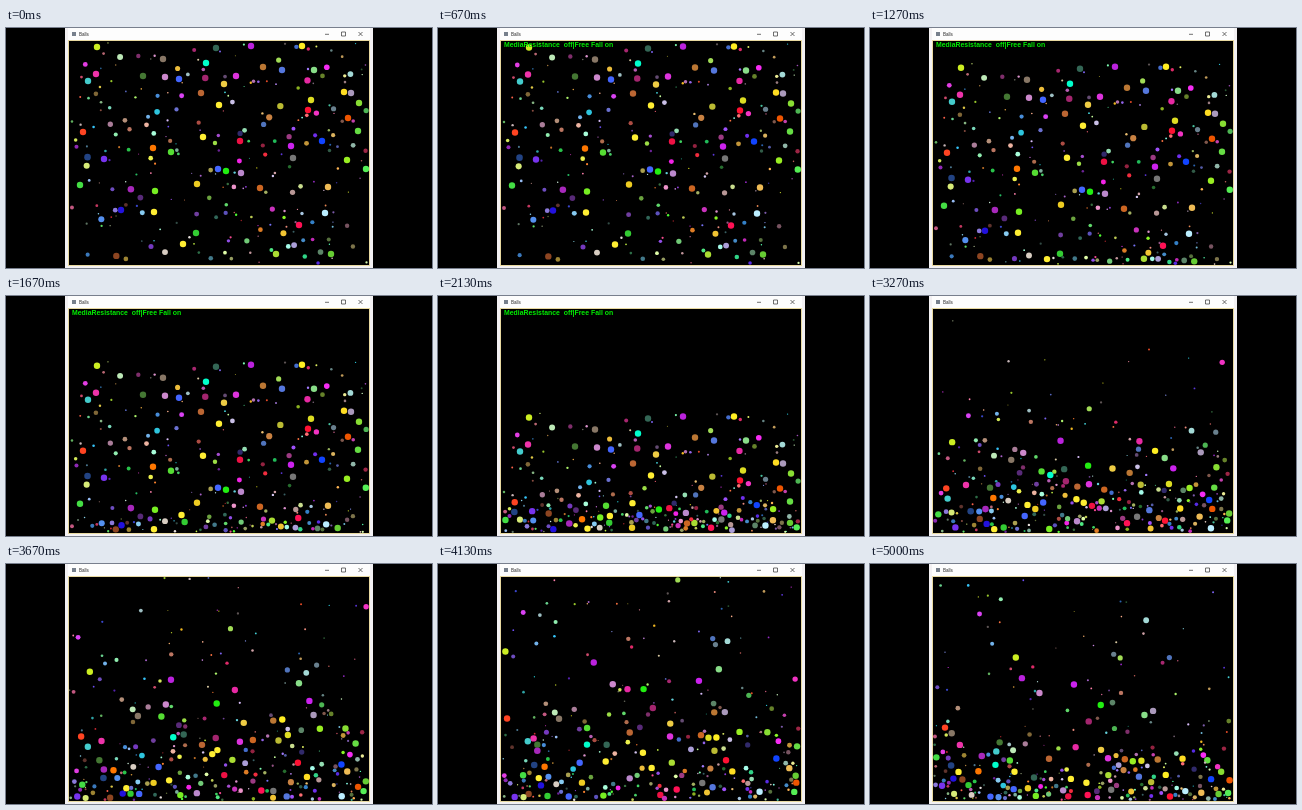
These frames come from a looping animation (426x240 px, 5.07 s). An HTML page with a canvas:

```html
<!DOCTYPE html>
<html lang="en">
<head>
<meta charset="utf-8">
<title>Balls</title>
<style>
  html, body { margin: 0; height: 100%; overflow: hidden; background: #000; }
  canvas { display: block; width: 100vw; height: 100vh; }
</style>
</head>
<body>
<canvas id="stage" width="426" height="240"></canvas>
<script>
const ctx = document.getElementById('stage').getContext('2d');
const LOOP = 5070, FRAMES = 76, FRAME_MS = 200 / 3;
const SUBSTEPS = 10, DT = FRAME_MS / SUBSTEPS;
const FALL_START = 556, CAPTION_END = 2560;
const GRAVITY = 8.24e-5;            // px per ms squared
const BOX = { l: 63, t: 13, r: 363, b: 237 };

let seed = 20117;
function rnd() {
  seed = (seed + 0x6D2B79F5) | 0;
  let h = Math.imul(seed ^ (seed >>> 15), 1 | seed);
  h = (h + Math.imul(h ^ (h >>> 7), 61 | h)) ^ h;
  return ((h ^ (h >>> 14)) >>> 0) / 4294967296;
}
const between = (a, b) => a + (b - a) * rnd();

// The large balls: x, y, colour
const large = [
  [91, 19, '#ce2'], [90, 46, '#e3a'], [82, 53, '#4cc'], [157, 31, '#876'],
  [159, 49, '#c8c'], [137, 48, '#473'], [173, 51, '#46f'], [200, 35, '#0fc'],
  [210, 20, '#365'], [245, 18, '#b2d'], [257, 39, '#b73'], [230, 48, '#d3d'],
  [218, 56, '#ec4'], [276, 42, '#57d'], [296, 18, '#fe2'], [308, 42, '#8d8'],
  [305, 72, '#dd2'], [302, 82, '#f13'], [338, 64, '#fd2'], [345, 65, '#a9b'],
  [353, 75, '#8d3'], [342, 90, '#e50'], [352, 103, '#6d4'], [285, 118, '#c2e'],
  [287, 130, '#777'], [213, 77, '#fe3'], [197, 109, '#fe3'], [195, 65, '#b63'],
  [234, 113, '#e14'], [316, 113, '#14f'], [77, 104, '#f42'], [147, 120, '#f70'],
  [165, 124, '#5d3'], [98, 131, '#73e'], [74, 157, '#4d4'], [149, 163, '#7e2'],
  [220, 143, '#2e1'], [212, 141, '#46f'], [191, 156, '#ec2'], [254, 160, '#c62'],
  [235, 145, '#b8c'], [341, 132, '#9e2'], [360, 141, '#5e5'], [322, 159, '#eb5'],
  [115, 182, '#21d'], [148, 184, '#fe3'], [190, 205, '#3c3'], [177, 216, '#fe3'],
  [319, 185, '#bef'], [293, 197, '#f15'], [325, 226, '#6c3'], [270, 226, '#ad3']
];

const balls = [];
function addBall(x, y, r, color) {
  balls.push({ x, y, r, color, vx: 0, vy: 0, m: r });
}

function scatter(count, rMin, rMax) {
  while (count > 0) {
    const r = between(rMin, rMax);
    const x = between(BOX.l + r, BOX.r - r), y = between(BOX.t + r, BOX.b - r);
    if (balls.some(b => Math.hypot(b.x - x, b.y - y) < b.r + r)) continue;
    const [red, green, blue] = [0, 0, 0].map(() => Math.round(between(30, 255)));
    addBall(x, y, r, `rgb(${red},${green},${blue})`);
    count--;
  }
}

for (const [x, y, color] of large) addBall(x, y, 3.2, color);
scatter(18, 2.8, 3.3);
scatter(95, 1.7, 2.7);
scatter(130, 0.5, 1.4);

function collide(a, b) {
  const dx = b.x - a.x, dy = b.y - a.y, d2 = dx * dx + dy * dy;
  const reach = a.r + b.r;
  if (d2 >= reach * reach || d2 === 0) return;
  const dot = (b.vx - a.vx) * dx + (b.vy - a.vy) * dy;
  if (dot >= -1e-9) return;
  const k = 1.98 * dot / (d2 * (a.m + b.m));
  a.vx += k * b.m * dx; a.vy += k * b.m * dy;
  b.vx -= k * a.m * dx; b.vy -= k * a.m * dy;
}

function move(b, dt) {
  b.x += b.vx * dt;
  b.y += b.vy * dt + GRAVITY * dt * dt / 2;
  b.vy += GRAVITY * dt;
  if (b.x < BOX.l + b.r) { b.x = BOX.l + b.r; b.vx = Math.abs(b.vx); }
  if (b.x > BOX.r - b.r) { b.x = BOX.r - b.r; b.vx = -Math.abs(b.vx); }
  if (b.y < BOX.t + b.r) { b.y = BOX.t + b.r; b.vy = Math.abs(b.vy); }
  if (b.y > BOX.b - b.r) { b.y = BOX.b - b.r; b.vy = -0.97 * Math.abs(b.vy); }
}

function step(dt, order) {
  for (const b of balls) move(b, dt);
  order.sort((a, b) => a.x - b.x);
  for (let i = 0; i < order.length; i++) {
    for (let j = i + 1; j < order.length && order[j].x - order[i].x < 6.6; j++) {
      collide(order[i], order[j]);
    }
  }
}

// Run the physics once, keeping the positions for every picture
function simulate() {
  const order = balls.slice(), shots = [];
  for (let f = 0; f < FRAMES; f++) {
    shots.push(balls.map(b => [b.x, b.y]));
    for (let s = 1; s <= SUBSTEPS; s++) {
      const dt = Math.min(DT, f * FRAME_MS + s * DT - FALL_START);
      if (dt > 0) step(dt, order);
    }
  }
  return shots;
}
const shots = simulate();

function rect(x, y, w, h, color) {
  ctx.fillStyle = color;
  ctx.fillRect(x, y, w, h);
}

function label(text, x, y, font, color) {
  ctx.font = font + ' "Liberation Sans", Arial, sans-serif';
  ctx.fillStyle = color;
  ctx.fillText(text, x, y);
}

function drawWindow() {
  rect(0, 0, 426, 240, '#000');
  rect(59, 0, 308, 240, '#f3f1f3');
  rect(62, 0, 302, 12, '#fdfdfd');
  rect(62, 12, 302, 226, '#e8d9a0');
  rect(63, 13, 300, 224, '#000');
  rect(66, 4, 4, 4, '#77808c');
  label('Balls', 73, 7.8, '4.5px', '#222');
  ctx.strokeStyle = '#333';
  ctx.lineWidth = 0.7;
  ctx.beginPath();
  ctx.moveTo(319, 6.3); ctx.lineTo(323, 6.3);
  ctx.rect(335.5, 4, 4, 4);
  ctx.moveTo(352.5, 4); ctx.lineTo(356.5, 8);
  ctx.moveTo(356.5, 4); ctx.lineTo(352.5, 8);
  ctx.stroke();
}

function drawBalls(shot) {
  ctx.save();
  ctx.beginPath();
  ctx.rect(BOX.l, BOX.t, BOX.r - BOX.l, BOX.b - BOX.t);
  ctx.clip();
  balls.forEach((b, i) => {
    ctx.fillStyle = b.color;
    ctx.beginPath();
    ctx.arc(shot[i][0], shot[i][1], b.r, 0, Math.PI * 2);
    ctx.fill();
  });
  ctx.restore();
}

function draw(now) {
  const frame = Math.min(FRAMES - 1, Math.floor((now % LOOP + 4) / FRAME_MS));
  const time = frame * FRAME_MS;
  drawWindow();
  drawBalls(shots[frame]);
  if (time >= FALL_START && time < CAPTION_END) {
    label('MediaResistance  off|Free Fall on', 66, 19.2, 'bold 6.9px', '#0e0');
  }
}

const start = performance.now();
function tick() {
  draw(performance.now() - start);
  requestAnimationFrame(tick);
}
tick();
</script>
</body>
</html>
```
